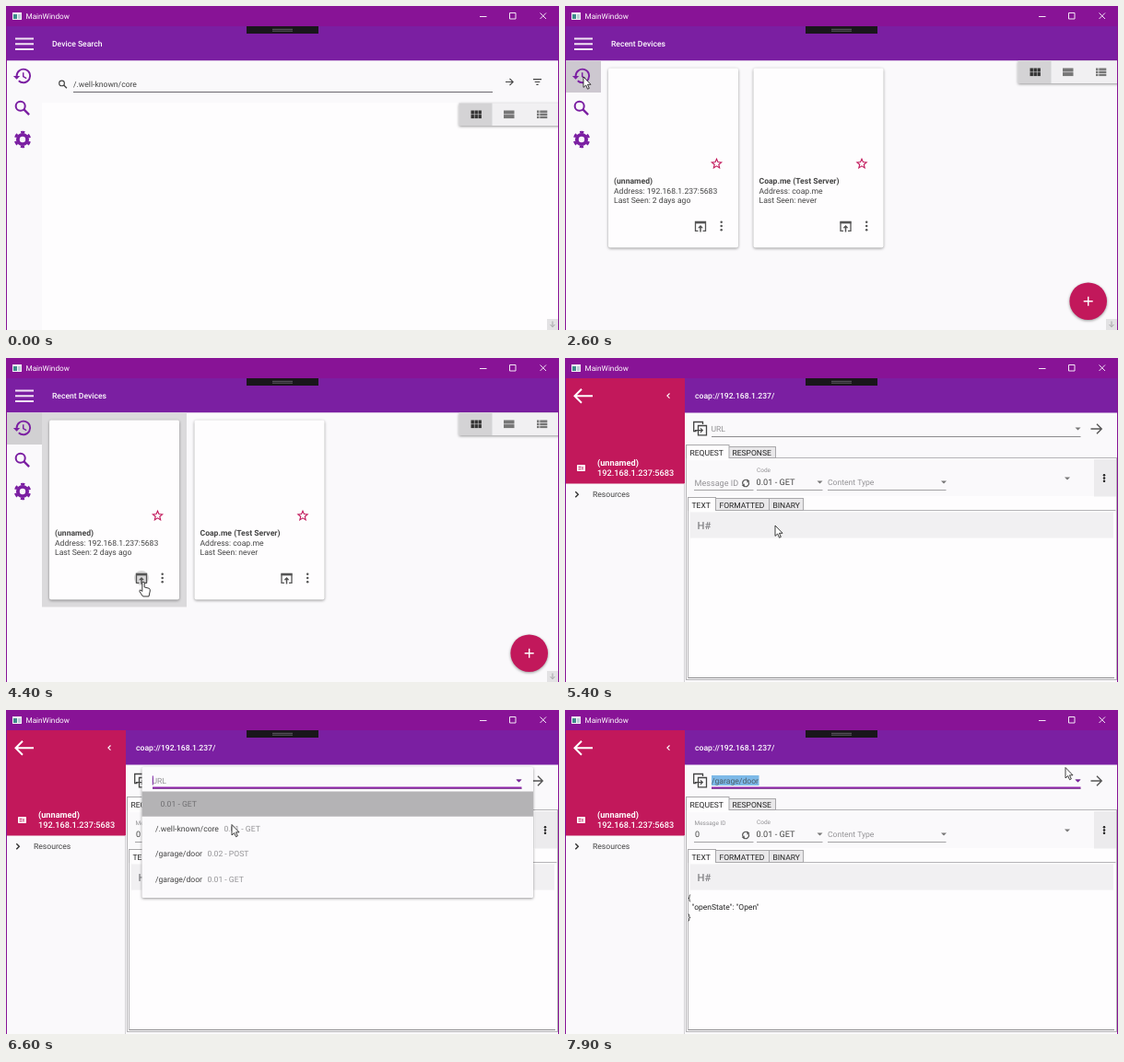
These frames come from a looping animation (600x352 px, 8000 ms). An HTML page:

```html
<!DOCTYPE html>
<html lang="en">
<head>
<meta charset="utf-8">
<title>MainWindow</title>
<style>
  html, body { margin: 0; width: 100%; height: 100%; overflow: hidden; background: #faf9fb; }
  svg { display: block; width: 600px; height: 352px; }
  text { font: 8.6px Roboto, sans-serif; fill: #444; white-space: pre; text-rendering: geometricPrecision; }
  .shadow { filter: drop-shadow(0 1px 1.5px rgba(0, 0, 0, .4)); }
  .line { fill: none; }
</style>
</head>
<body>
<svg id="stage" viewBox="0 0 600 352"></svg>
<script>
const PURPLE = '#7b1fa2', PINK = '#c2185b', DARK = '#444', GREY = '#949396', PAGE = '#faf9fb';

// drawing helpers
const rect = (x, y, w, h, fill, more = '') =>
  `<rect x="${x}" y="${y}" width="${w}" height="${h}" fill="${fill}" ${more}/>`;
const line = (d, color, width = 1, more = '') =>
  `<path class="line" d="${d}" stroke="${color}" stroke-width="${width}" ${more}/>`;
const fill = (d, color, more = '') => `<path d="${d}" fill="${color}" ${more}/>`;
const text = (x, y, str, color = DARK, size = 8.6, weight = 400, more = '') =>
  `<text x="${x}" y="${y}" style="fill:${color};font-size:${size}px;font-weight:${weight}" ${more}>${str}</text>`;
const group = (id, body, more = '') => `<g id="${id}" ${more}>${body}</g>`;
const at = (x, y, body, scale = 1) => `<g transform="translate(${x} ${y}) scale(${scale})">${body}</g>`;
const drop = (x, y, color = '#777') => fill(`M${x} ${y}h6l-3 3z`, color);
const dots = (x, y, step, color) => [-1, 0, 1].map(i =>
  `<circle cx="${x}" cy="${y + i * step}" r="1.25" fill="${color}"/>`).join('');

// icons on a 24 unit grid
const icons = {
  history: c => line('M5 12A8 8 0 1 1 7.4 17.7', c, 2.1) + fill('M1 12H9L5 16z', c) +
    line('M12.8 8V12.6L16.6 14.9', c, 1.6),
  search: c => `<circle cx="9.5" cy="9.5" r="5.5" fill="none" stroke="${c}" stroke-width="2.2"/>` +
    line('M13.6 13.6L19.8 19.8', c, 2.6),
  gear: c => `<circle cx="12" cy="12" r="5.6" fill="none" stroke="${c}" stroke-width="4.2"/>` +
    `<circle cx="12" cy="12" r="8.7" fill="none" stroke="${c}" stroke-width="2.7" stroke-dasharray="4.5 4.61" transform="rotate(15.2 12 12)"/>`
};

function star(cx, cy) {
  const pts = Array.from({ length: 10 }, (_, i) => {
    const r = i % 2 ? 2.4 : 5.4, a = i * Math.PI / 5;
    return (cx + r * Math.sin(a)).toFixed(2) + ',' + (cy - r * Math.cos(a)).toFixed(2);
  });
  return `<polygon points="${pts.join(' ')}" fill="none" stroke="${PINK}" stroke-width="1.1"/>`;
}

function viewToggle(y) {
  let s = rect(491.5, y, 120, 24.5, '#f1f0f2', 'class="shadow" rx="1"') + rect(491.5, y, 36, 24.5, '#d4d3d5');
  for (let i = 0; i < 6; i++) s += rect(504.5 + i % 3 * 4, y + 8 + (i > 2) * 4.6, 3.4, 4, '#333');
  for (let i = 0; i < 2; i++) s += rect(540, y + 8 + i * 4.6, 11.5, 4, '#777');
  for (let i = 0; i < 3; i++) s += rect(576, y + 8 + i * 3.1, 2.5, 2.4, '#777') + rect(579.3, y + 8 + i * 3.1, 8, 2.4, '#777');
  return s;
}

function card(x, name, address, seen) {
  return rect(x, 67.5, 141, 195, '#fefdfe', 'class="shadow" rx="2"') + star(x + 117.5, 171.5) +
    text(x + 6, 193, name, DARK, 8.6, 700) +
    text(x + 6, 203.5, 'Address: ' + address) + text(x + 6, 214, 'Last Seen: ' + seen) +
    line(`M${x + 97.5} 244.3H${x + 94.5}V234.5H${x + 105.5}V244.3H${x + 102.5}`, '#555', 1.3) +
    line(`M${x + 94} 235.4h12`, '#555', 2) +
    line(`M${x + 100} 245.5V239`, '#555', 1.5) + fill(`M${x + 97} 241.2l3-3.2 3 3.2z`, '#555') +
    dots(x + 122.7, 239, 4.2, '#555');
}

function tab(x, w, y, h, label, on) {
  return rect(x + .5, y + .5, w, h, on ? '#fefdfe' : '#e9e8ea', 'stroke="#a9a8ab"') +
    (on ? rect(x + 1, y + h, w - 1, 1.5, '#fefdfe') : '') + text(x + 4.5, y + h - 2, label, '#222', 8.5);
}

const chrome =
  rect(0, 0, 600, 22, '#881396') +
  rect(7, 7, 10, 8, '#f4f4f6') + rect(8, 9, 4, 5, '#3f8a8c') + rect(13, 9, 3, 5, '#b9cdd6') +
  text(21.5, 14, 'MainWindow', '#fff', 8.2, 400, 'font-family="Open Sans"') +
  line('M514 11.5h7.5M546.5 7.5h6.5v6.5h-6.5zM579.5 7.5l6.5 6.5M586 7.5l-6.5 6.5', '#f3e6f5') +
  rect(261, 22, 78, 8, '#19161b') + line('M289 25.3h22M289 27.2h22', '#67646a', .9) +
  rect(0, 22, 1, 330, '#881396') + rect(599, 22, 1, 330, '#881396');

const grip = rect(587, 340, 12, 12, '#e3e2e4') + line('M593 342.5v6M590.5 346l2.5 2.7 2.5-2.7', '#a5a4a7');

const home =
  rect(0, 22, 600, 37.5, PURPLE) + line('M10 35.5h20M10 41.3h20M10 47h20', '#f3e5f5', 2) +
  rect(0, 59.5, 600, 293, PAGE) +
  group('rowHover', rect(1, 59.5, 38, 34.5, '#e2e1e3')) +
  group('rowOn', rect(1, 59.5, 38, 34.5, '#d1d0d2')) +
  `<circle id="rowRipple" cx="20" cy="77" fill="${PURPLE}" clip-path="url(#rowClip)"/>` +
  at(7, 65, icons.history(PURPLE), .915) + at(7, 100, icons.search(PURPLE), .915) +
  at(7, 134, icons.gear(PURPLE), .915);

const searchPage =
  rect(39, 105, 560, 247, '#fefdfe') + at(55.6, 79, icons.search(DARK), .52) +
  text(50, 44, 'Device Search', '#fff', 8.6, 500) + text(73, 88, '/.well-known/core') +
  line('M73 93.5H528', '#6b686e') + line('M542 82.5h8M546.5 78.8l3.7 3.7-3.7 3.7', DARK, 1.1) +
  line('M572 79.7h9M573.7 82.5h5.6M575.4 85.3h2.2', DARK, 1.2) + viewToggle(105.5);

const recentPage =
  text(50, 44, 'Recent Devices', '#fff', 8.6, 500) +
  group('cardHover', rect(39, 59.5, 157, 211, '#dbdadc')) +
  card(47, '(unnamed)', '192.168.1.237:5683', '2 days ago') +
  card(204.5, 'Coap.me (Test Server)', 'coap.me', 'never') +
  '<circle id="cardRipple" cx="147" cy="239" fill="#555"/>' + viewToggle(59.5) +
  `<circle class="shadow" cx="567.7" cy="320.7" r="20.3" fill="${PINK}"/>` +
  line('M562.7 320.7h10M567.7 315.7v10', '#fff', 1.4);

const devicePage =
  rect(0, 22, 600, 330, PAGE) + rect(130, 22, 470, 37.5, PURPLE) +
  rect(0, 22, 130, 114.5, PINK) + line('M129.5 136.5V352', '#d2d1d4') +
  line('M10.5 41.3H30M18 33.8L10.5 41.3 18 48.8', '#fff', 2) + line('M113.5 38.5l-2.6 2.6 2.6 2.6', '#fff', 1.1) +
  rect(13, 116, 9, 7, '#fff', 'rx=".8"') + line('M14.5 118.5h3M14.5 120.7h3M19 118v3.5', PINK, 1) +
  text(35, 117, '(unnamed)', '#fff', 9.2, 700) + text(35, 128, '192.168.1.237:5683', '#fff', 9.2, 500) +
  line('M11.3 145.2l3 3-3 3', '#333', 1.4) + text(30, 151, 'Resources') +
  text(141, 44, 'coap://192.168.1.237/', '#fff', 8.6, 500) +
  line('M142.5 79.5H139.7V69.5H149.5V72', DARK, 1.3) + line('M144.5 73.5h9v10.3h-9z', DARK, 1.3) +
  line('M141 78.6h8M147 76.4l2.3 2.2-2.3 2.2', DARK, 1.1) +
  line('M570.5 77H582M577 71.8l5.2 5.2-5.2 5.2', '#555', 1.4) +
  rect(131.5, 108.5, 467, 241, '#fefdfe', 'stroke="#b4b3b6"') +
  tab(177, 51, 96, 12, 'RESPONSE') + tab(131, 46.5, 94, 14, 'REQUEST', true) +
  rect(134, 111, 440, 39, PAGE) + rect(574, 110, 24, 40.5, '#ecebed') + dots(585, 130.5, 3.2, '#222') +
  group('idLabel', '<text id="idText" x="140.5" y="139">Message ID</text>') +
  group('idValue', text(141, 138, '0', DARK, 9)) +
  line('M193 137.2A3.4 3.4 0 0 1 198.4 133.3M199.2 134.8A3.4 3.4 0 0 1 193.8 138.7', '#555', 1.1) +
  fill('M197.5 131.5l3 2.4-3 1.6zM194.7 140.5l-3-2.4 3-1.6z', '#555') +
  text(208, 124, 'Code', GREY, 6.5) + text(207.5, 137.5, '0.01 - GET', DARK, 9.2) +
  text(285, 138, 'Content Type', GREY) +
  line('M140 143.5H204.5M208 143.5H279.5M285 143.5H413.5', '#a3a2a5') +
  drop(273.5, 133.5) + drop(408, 133.5) + drop(542, 129.5) +
  line('M133 165.5H597.5M133.5 165V348', '#b4b3b6') +
  tab(163, 58, 152, 13, 'FORMATTED') + tab(221, 37, 152, 13, 'BINARY') + tab(133, 30, 151, 14, 'TEXT', true) +
  rect(136, 167.5, 459, 28, '#f1f0f2') + text(143.5, 185.5, 'H#', '#858488', 11.2, 500) +
  line('M134 347.5H596', '#8c8b8e') +
  group('body', ['{', '  "openState": "Open"', '}'].map((s, i) =>
    text(133.5, 207 + i * 10.3, s, '#222', 8.5, 400, 'xml:space="preserve"')).join(''));

const rowY = i => 88.5 + i * 27.2;
const item = (i, path, code) => path
  ? `<text x="162" y="${rowY(i) + 16.5}">${path}<tspan dx="5.5" fill="${GREY}" style="fill:${GREY}">${code}</tspan></text>`
  : text(167.5, rowY(i) + 16.5, code, '#6f6e71');
const get = ['/garage/door', '0.01 - GET'], post = ['/garage/door', '0.02 - POST'],
  core = ['/.well-known/core', '0.01 - GET'], blank = ['', '0.01 - GET'];
const list = items => items.map((it, i) => item(i, ...it)).join('');

const popup =
  rect(147.5, 62, 424.5, 142, '#fbfafc', 'class="shadow" rx="1.5"') +
  group('listHover', rect(147.5, 0, 424.5, 27.2, '#e4e3e5')) +
  group('before', rect(147.5, rowY(0), 424.5, 27.2, '#b4b3b5') + list([blank, core, post, get])) +
  group('after', rect(147.5, rowY(0), 424.5, 27.2, '#e2e1e3') + rect(147.5, rowY(1), 424.5, 27.2, '#d3d2d4') +
    list([get, blank, core, post])) +
  '<circle id="itemRipple" cx="232" fill="#555" clip-path="url(#itemClip)"/>';

const urlField =
  line('M159 85.5H559.5', '#8d8c8f') + drop(553.5, 75.5) +
  group('urlFocus', line('M159 84.5H559.5', '#8e24aa', 1.8) + drop(553.5, 75.5, PURPLE)) +
  group('urlHint', text(158.5, 79.5, 'URL', GREY)) +
  group('caret', line('M159.3 71.5v10', PURPLE)) +
  group('urlText', rect(159, 71, 51.5, 11, '#7db9e8') + text(159, 79.5, '/garage/door', '#4b5a66'));

const cursors =
  group('arrow', fill('M0 0V11.4L2.7 9 4.5 13.2 6.3 12.4 4.5 8.3H8Z', '#fff', 'stroke="#111" stroke-width=".8"')) +
  group('hand', fill('M-1.2 .8Q0 -.6 1.2 .8V6L6 7.2Q7.7 8 7.3 10L6 16H-.5L-4 10.8Q-4.4 8.6 -3 9L-1.2 10.5Z', '#fff',
    'stroke="#222" stroke-width=".9" transform="translate(1.5 -1)"')) +
  group('beam', line('M-2.5 -7H2.5M0 -7V7M-2.5 7H2.5', '#222'));

const stage = document.getElementById('stage');
stage.innerHTML =
  `<defs><clipPath id="rowClip">${rect(1, 59.5, 38, 34.5, '#000')}</clipPath>` +
  `<clipPath id="itemClip"><rect id="clipRow" x="147.5" width="424.5" height="27.2"/></clipPath></defs>` +
  home + group('search', searchPage) + group('recent', recentPage) + grip +
  group('device', devicePage + group('popup', popup) + urlField) + chrome + cursors;

const el = {};
stage.querySelectorAll('[id]').forEach(n => el[n.id] = n);
const set = (id, attrs) => { for (const k in attrs) el[id].setAttribute(k, attrs[k]); };
const show = (id, v) => el[id].setAttribute('opacity', +v);

// keys: [time, value], linear between
function track(t, keys) {
  if (t <= keys[0][0]) return keys[0][1];
  for (let i = 1; i < keys.length; i++) {
    const [t1, b] = keys[i], [t0, a] = keys[i - 1];
    if (t <= t1) return a + (b - a) * (t - t0) / (t1 - t0);
  }
  return keys[keys.length - 1][1];
}

// pointer stops: time, x, y; eased between
const stops = [[900, 592, 346], [1800, 20, 77], [2600, 20, 77], [3500, 147.5, 244], [5100, 147.5, 244],
  [5400, 228, 182], [5800, 252, 82], [6300, 252, 82], [6600, 245, 124.5], [7000, 232.5, 181],
  [7300, 232.5, 181], [7900, 543, 62.5]];
function pointer(t) {
  let i = 0;
  while (i < stops.length - 2 && t > stops[i + 1][0]) i++;
  const [t0, x0, y0] = stops[i], [t1, x1, y1] = stops[i + 1];
  const u = Math.min(1, Math.max(0, (t - t0) / (t1 - t0))), e = u * u * (3 - 2 * u);
  return [x0 + (x1 - x0) * e, y0 + (y1 - y0) * e];
}

function render(t) {
  const [x, y] = pointer(t);
  const hand = t >= 3400 && t < 4600, beam = t >= 5800 && t < 6400;
  for (const id of ['arrow', 'hand', 'beam']) set(id, { transform: `translate(${x} ${y})` });
  show('arrow', t >= 1000 && !hand && !beam);
  show('hand', hand);
  show('beam', beam);

  const recent = track(t, [[2200, 0], [2600, 1]]);
  show('search', 1 - recent);
  show('recent', recent);
  show('rowHover', t >= 1000 && t < 2300 && x < 39 && y < 94);
  show('rowOn', recent);
  set('rowRipple', { r: track(t, [[2000, 0], [2100, 9], [2200, 9], [2500, 40]]),
    opacity: track(t, [[2000, 0], [2100, .18], [2300, .18], [2700, 0]]) });
  show('cardHover', x > 39 && t > 2600);
  set('cardRipple', { r: track(t, [[4200, 0], [4500, 12]]),
    opacity: track(t, [[4200, 0], [4300, .22], [4500, .22], [4800, 0]]) });

  show('device', track(t, [[4500, 0], [4900, 1]]));
  const up = track(t, [[5900, 0], [6100, 1]]);
  el.idText.setAttribute('style', `font-size:${9.1 - 2.6 * up}px;fill:${GREY}`);
  set('idText', { y: 139 - 14 * up });
  show('idValue', up);

  const done = t >= 7200;
  show('body', done);
  show('urlText', done);
  show('urlHint', !done);
  show('urlFocus', track(t, [[6200, 0], [6400, 1]]));
  show('caret', t >= 6300 && !done);
  show('popup', track(t, [[6200, 0], [6500, 1], [7100, 1], [7200, .78], [7400, 0]]));
  show('before', !done);
  show('after', done);
  const row = Math.floor((y - rowY(0)) / 27.2);
  show('listHover', t > 6600 && t < 7500 && row > 1);
  set('listHover', { transform: `translate(0 ${rowY(Math.max(0, Math.min(3, row)))})` });
  const top = rowY(done ? 0 : 3);
  set('clipRow', { y: top });
  set('itemRipple', { cy: top + 13, r: track(t, [[7000, 0], [7100, 22], [7200, 49], [7400, 80]]),
    opacity: track(t, [[7000, 0], [7100, .26], [7200, .26], [7400, 0]]) });
}

const start = performance.now();
function frame(now) {
  const t = Math.max(0, now - start) % 8000;
  render(Math.floor(t / 100) * 100);
  requestAnimationFrame(frame);
}
render(0);
requestAnimationFrame(frame);
</script>
</body>
</html>
```
